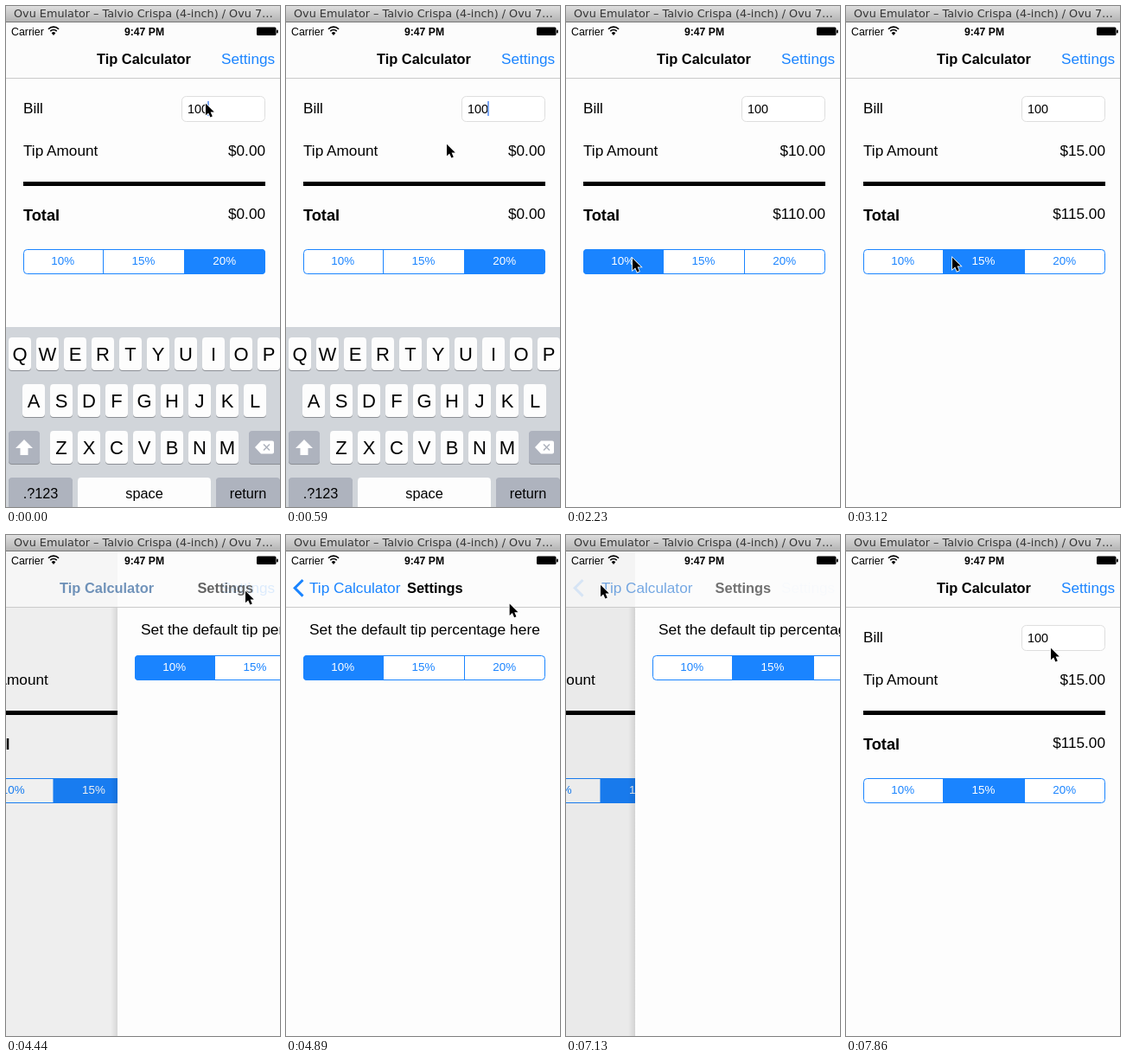
Write an HTML page that moves like this. It is 317 px wide and 579 px high and loops after 8000 ms.

```html
<!DOCTYPE html>
<html lang="en">
<head>
<meta charset="utf-8">
<title>Tip Calculator</title>
<style>
html, body { margin: 0; width: 100%; height: 100%; overflow: hidden; background: #fdfdfd; }
svg { display: block; width: 100%; height: 100%; font-family: "Liberation Sans", Arial, sans-serif; }
</style>
</head>
<body>
<svg id="stage" viewBox="0 0 317 579" xmlns="http://www.w3.org/2000/svg"></svg>
<script>
const W = 317, H = 579, LOOP = 8000, STEP = 148, LAST = 53;
const BLUE = '#1a84ff', BODY = 17.2, BILL = 100, PARALLAX = 97;
const stage = document.getElementById('stage');

// Pointer stops: [step, x, y]
const pointerPath = [
  [0, 231, 112], [3, 186, 159], [8, 186, 159], [9, 165, 205], [10, 130, 262],
  [11, 109, 292], [13, 77, 291], [16, 77, 291], [18, 123, 290], [22, 123, 290],
  [26, 272, 32], [27, 277, 64], [32, 277, 64], [38, 167, 152], [42, 167, 152],
  [45, 40, 57], [49, 40, 57], [52, 228, 119], [53, 237, 130]
];

// Page transitions: step -> [page x, bar progress, title opacity]
const slides = {
  29: [290, .95, 0], 30: [129, .45, .6], 31: [24, .08, .92], 32: [2, 0, 1],
  48: [80, .18, .55], 49: [236, .7, .15], 50: [306, .97, 0]
};
const keyboardDrop = { 4: 40, 5: 165, 6: 208 };

const mix = (a, b, k) => a + (b - a) * k;
const money = n => '$' + n.toFixed(2);

function rect(x, y, w, h, fill, extra = '') {
  return `<rect x="${x}" y="${y}" width="${w}" height="${h}" fill="${fill}" ${extra}/>`;
}

function text(s, x, y, { size = BODY, fill = '#000', anchor = 'start', bold = false, alpha = 1 } = {}) {
  return `<text x="${x}" y="${y}" font-size="${size}" fill="${fill}" text-anchor="${anchor}"
    font-weight="${bold ? 700 : 400}" opacity="${alpha}">${s}</text>`;
}

function group(body, x = 0, y = 0) {
  return `<g transform="translate(${x} ${y})">${body}</g>`;
}

function pointerAt(step) {
  const i = Math.max(1, pointerPath.findIndex(p => p[0] >= step));
  const [s0, x0, y0] = pointerPath[i - 1], [s1, x1, y1] = pointerPath[i];
  const k = (step - s0) / (s1 - s0);
  return [mix(x0, x1, k), mix(y0, y1, k)];
}

function segments(y, selected, pressed) {
  const edges = [20, 112.5, 206.5, 300];
  let out = `<clipPath id="seg${y}"><rect x="20" y="${y}" width="280" height="29" rx="4"/></clipPath>`;
  out += rect(20.5, y + .5, 279, 28, '#fff', 'rx="4"');
  ['10%', '15%', '20%'].forEach((label, i) => {
    const x = edges[i], w = edges[i + 1] - x;
    const fill = i === selected ? BLUE : i === pressed ? '#dceaff' : 'none';
    out += rect(x, y, w, 29, fill, `clip-path="url(#seg${y})"`);
    out += text(label, x + w / 2 - .5, y + 18, {
      size: 13.4, anchor: 'middle', alpha: i === pressed ? .75 : 1,
      fill: i === selected ? '#fff' : BLUE
    });
    if (i) out += rect(x - .5, y, 1, 29, BLUE);
  });
  return out + rect(20.5, y + .5, 279, 28, 'none', `rx="4" stroke="${BLUE}"`);
}

function calculatorPage(step) {
  const selected = step < 15 ? 2 : step < 21 ? 0 : 1;
  const pressed = step === 14 ? 0 : step === 20 ? 1 : -1;
  const tip = BILL * [.1, .15, .2][selected];
  const done = step >= 4;
  const right = { anchor: 'end' };
  return rect(0, 19, W + 100, H, '#fdfdfd')
    + text('Bill', 20, 124)
    + rect(203.5, 104.5, 96, 29, '#fff', 'rx="5" stroke="#dedede"')
    + text(BILL, 210, 124, { size: 14.4 })
    + (step < 4 ? rect(233, 110, 2, 17, '#7aa5f5') : '')
    + text('Tip Amount', 20, 173)
    + text(money(done ? tip : 0), 300, 173, right)
    + rect(20, 203, 280, 5, '#000')
    + text('Total', 20, 247.5, { size: 18.2, bold: true })
    + text(money(done ? BILL + tip : 0), 300, 246, right)
    + segments(281, selected, pressed);
}

function settingsPage(step) {
  return rect(-8, 84, 8, H, 'url(#edge)')
    + rect(0, 19, W, H, '#fdfdfd')
    + text('Set the default tip percentage here', 27, 115, { size: 17.4 })
    + segments(139, step < 41 ? 0 : 1, step === 40 ? 1 : -1);
}

function statusBar() {
  const arc = r => `<path d="M${55 - r * .72} ${33 - r * .75}A${r} ${r} 0 0 1 ${55 + r * .72} ${33 - r * .75}"
    fill="none" stroke="#000" stroke-width="1.6"/>`;
  return text('Carrier', 6, 34, { size: 12.4 })
    + arc(8.4) + arc(5.2) + '<path d="M55 34l-2.3-2.8a3.2 3.2 0 0 1 4.6 0Z"/>'
    + text('9:47 PM', 160, 34, { size: 12.2, bold: true, anchor: 'middle' })
    + rect(290, 24.5, 22.5, 9.5, '#000', 'rx="1.5"')
    + rect(313, 27.5, 1.7, 4, '#000', 'rx=".8"');
}

function navBar(step, home, titleAlpha) {
  const bold = { size: 16.4, bold: true };
  const linkAlpha = step === 28 ? .3 : home ** 2.5;
  const moving = home > 0 && home < 1;
  const shade = [26, 132, 255].map(c => Math.round(mix(c, 0, home)));
  return rect(0, 19, W, 64, '#fcfcfc', 'opacity=".6"')
    + rect(0, 83, W, 1, '#cbcbcb')
    + statusBar()
    + `<path d="M19.5 52l-9.3 9.3 9.3 9.3" fill="none" stroke="${BLUE}" stroke-width="3"
        opacity="${Math.max(0, 1 - home * 4.8)}"/>`
    + text('Tip Calculator', mix(27, 105, home), 67, {
      size: home > .4 ? 16.4 : BODY, bold: home > .4, fill: `rgb(${shade})`, alpha: moving ? .58 : 1
    })
    + text('Settings', 140 + 181 * home, 67, { ...bold, alpha: titleAlpha })
    + text('Settings', 249, 67, { fill: BLUE, alpha: linkAlpha });
}

function key(x, y, w, label, { fill = '#fdfdfd', size = 22, dy = 27 } = {}) {
  return rect(x, y + 1, w, 38, '#8b8e94', 'rx="4"') + rect(x, y, w, 38, fill, 'rx="4"')
    + text(label, x + w / 2, y + dy, { size, anchor: 'middle' });
}

function keyboard() {
  const grey = '#aeb3be', small = { size: 16.3, dy: 24 };
  const rows = [['QWERTYUIOP', 3], ['ASDFGHJKL', 19], ['ZXCVBNM', 51]];
  let out = rect(0, 371, W, 208, '#d1d5da');
  rows.forEach(([letters, x0], r) => {
    [...letters].forEach((c, i) => { out += key(x0 + i * 32, 383 + r * 54, 26, c); });
  });
  return out
    + key(3, 491, 36, '', { fill: grey })
    + '<path d="M21 501l10 10h-5.500v8h-9v-8H11Z" fill="#fff"/>'
    + key(281, 491, 40, '', { fill: grey })
    + '<path d="M288 510l7-7.500h13q2 0 2 2v11q0 2-2 2h-13Z" fill="#fff"/>'
    + `<path d="M298 506.500l7 7m0-7l-7 7" stroke="${grey}" stroke-width="1.5"/>`
    + key(3, 545, 74, '.?123', { ...small, fill: grey })
    + key(83, 545, 154, 'space', small)
    + key(243, 545, 74, 'return', { ...small, fill: grey });
}

function windowBar() {
  return rect(0, 0, W, 19, 'url(#metal)') + rect(0, 18, W, 1, '#777')
    + text('<tspan font-family="DejaVu Sans, sans-serif">Ovu Emulator – Talvio Crispa (4-inch) / Ovu 7…</tspan>',
      9, 13, { size: 12.8, fill: '#363636' });
}

const defs = `<defs>
  <linearGradient id="metal" x2="0" y2="1"><stop stop-color="#dedede"/><stop offset="1" stop-color="#b2b2b2"/></linearGradient>
  <linearGradient id="edge"><stop stop-opacity="0"/><stop offset="1" stop-opacity=".1"/></linearGradient>
</defs>`;
const arrow = `<path d="M0 .8V14.300L3.200 11.400 5.400 16.600 7.800 15.600 5.600 10.500H9.800Z"
  stroke="#fff" paint-order="stroke" stroke-width="1.6"/>`;

function scene(step) {
  const onSettings = step > 32 && step < 48;
  const [pageX, home, titleAlpha] = slides[step] || (onSettings ? [0, 0, 1] : [W, 1, 0]);
  const shown = 1 - pageX / W;
  const drop = step < 4 ? 0 : keyboardDrop[step] ?? 208;
  return defs
    + group(calculatorPage(step), -PARALLAX * shown)
    + rect(0, 19, W, H, '#000', `opacity="${.1 * shown}"`)
    + (shown > 0 ? group(settingsPage(step), pageX) : '')
    + navBar(step, home, titleAlpha)
    + (drop < 208 ? group(keyboard(), 0, drop) : '')
    + windowBar()
    + group(arrow, ...pointerAt(step));
}

const start = performance.now();
let current = -1;
function tick() {
  const time = (performance.now() - start) % LOOP;
  const step = Math.min(LAST, Math.floor(time / STEP));
  if (step !== current) stage.innerHTML = scene(current = step);
  requestAnimationFrame(tick);
}
tick();
</script>
</body>
</html>
```
